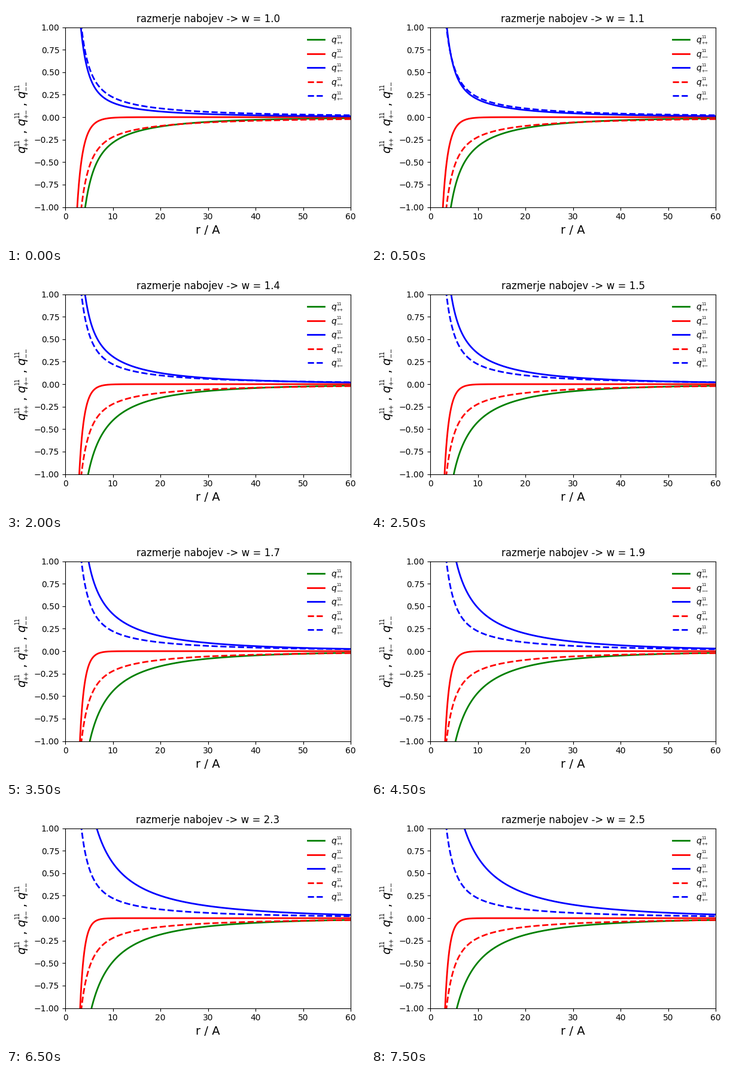
A matplotlib script that plays this animation: 600 px wide and 400 px high, repeating every 8 s.

```python
import numpy as np
import matplotlib.pyplot as plt
from matplotlib.animation import FuncAnimation
from matplotlib.lines import Line2D

W, H = 600, 400
plt.rcParams["font.family"] = "DejaVu Sans"

fig = plt.figure(figsize=(W / 100, H / 100), dpi=100, facecolor="white")
ax = fig.add_axes([99 / W, 1 - 336.6 / H, 477 / W, 301.1 / H])
r = np.linspace(1, 60, 1200)


def yukawa(amp, k):
    return amp * np.exp(-k * r) / r


def curves(w):
    """Pair functions ++, -- and +- for the charge ratio w."""
    t = w - 1
    c = 1.12 - 0.64 / w
    pp = -yukawa(7.1 - 3.4 / w**2, 0.0286) - yukawa(6.9 / w**2, c)
    r0 = 3.13 - 0.61 * abs((2.2 - w) / 1.2) ** 3
    mm = -yukawa(r0 * np.exp(c * r0), c)
    pm = (yukawa(1.9 + 4.75 * t - 0.32 * t**2, 0.0205)
          + yukawa(7.2 + 14 * t - 10 * t**2, c))
    return pp, mm, pm


def put(x, y, s, size, rot=0, **kw):
    fig.text(x / W, 1 - y / H, s, fontsize=size, rotation=rot, ha="left",
             va="baseline", rotation_mode="anchor", **kw)


def symbol(x, y, sub, size, rot=0):
    """Italic q with small stacked scripts; x, y is the baseline start in px."""
    k = size / 10

    def shifted(along, up):
        if rot:
            return x - up * k, y - along * k
        return x + along * k, y - up * k

    put(x, y, "q", size, rot, style="italic")
    put(*shifted(9.0, 7.5), "11", size * 0.49, rot)
    put(*shifted(9.0, -3.0), sub, size * 0.49, rot)


PP, MM, PM = "++", "\u2212\u2212", "+\u2212"

# Axes
ax.set_xlim(0, 60)
ax.set_ylim(-1, 1)
ax.set_xlabel("r / A", fontsize=14)
title = ax.set_title("", fontsize=12)
for i, sub in enumerate((PP, PM, MM)):
    y = 246.5 - 46.5 * i
    symbol(32.5, y, sub, 14, 90)
    if i < 2:
        put(32.5, y - 34.5, ",", 14, 90)

# Curves
solid = [ax.plot([], [], color=c, lw=2)[0] for c in ("green", "red", "blue")]
ref = yukawa(2.4, 0.0105) + yukawa(5.2, 0.46)
ax.plot(r, -ref, "--", color="red", lw=2)
ax.plot(r, ref, "--", color="blue", lw=2)

# Legend
rows = [("green", "-", PP), ("red", "-", MM), ("blue", "-", PM),
        ("red", "--", PP), ("blue", "--", PM)]
for i, (color, style, sub) in enumerate(rows):
    y = 56.2 + 23.55 * i
    fig.add_artist(Line2D([503.9 / W, 531.7 / W], [1 - y / H] * 2,
                          color=color, ls=style, lw=2))
    symbol(543.3, y + 4.8, sub, 10)


def update(i):
    w = 1 + i / 10
    for line, q in zip(solid, curves(w)):
        line.set_data(r, q)
    title.set_text(f"razmerje nabojev -> w = {w:.1f}")
    return [*solid, title]


anim = FuncAnimation(fig, update, frames=16, interval=500, repeat=True,
                     repeat_delay=0, blit=False)
plt.show()
```
